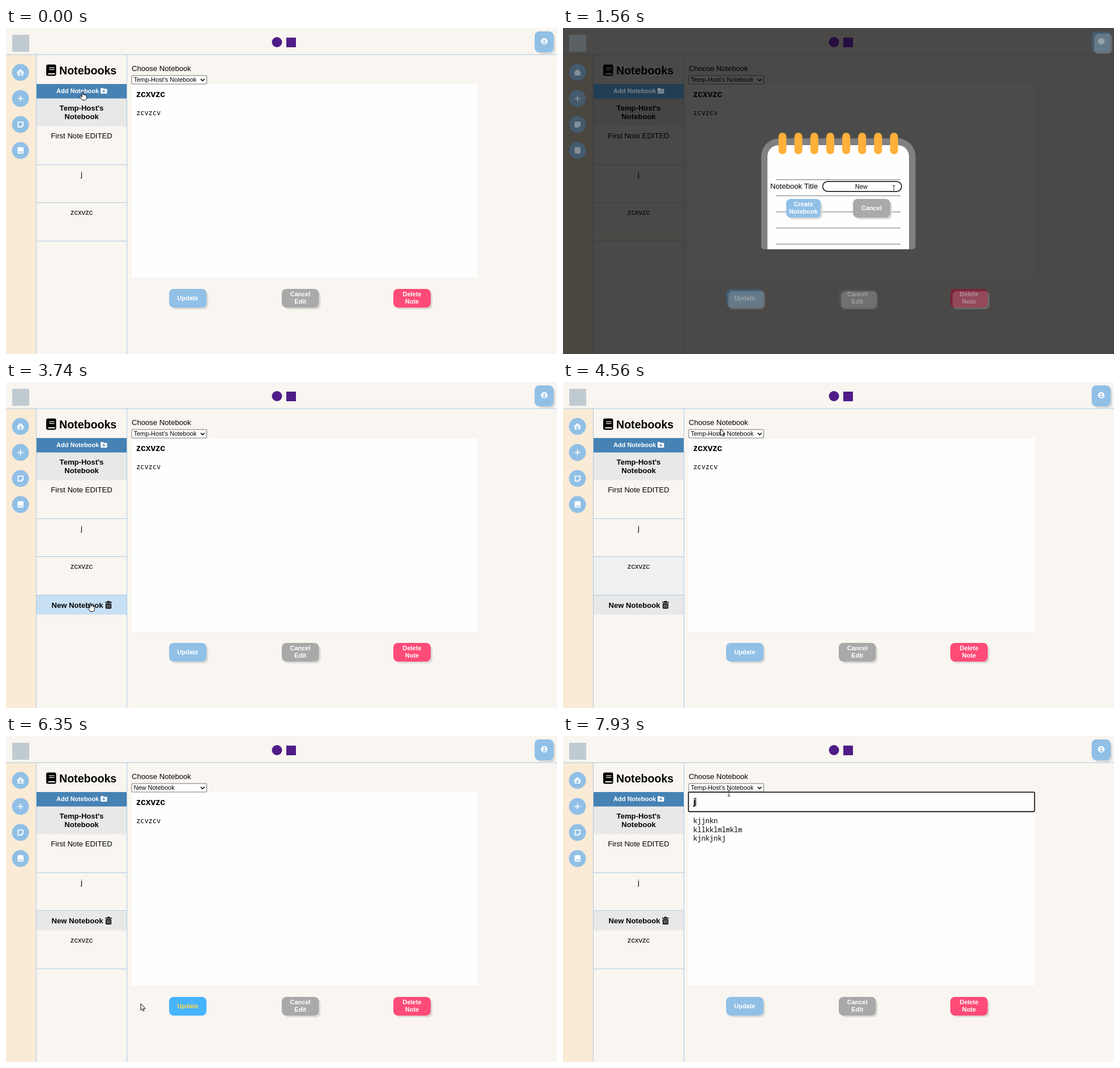
These frames come from a looping animation (973x576 px, 8 s). An HTML page with a canvas:

```html
<!DOCTYPE html>
<html lang="en">
<head>
<meta charset="utf-8">
<title>Notebooks</title>
<style>
html, body { margin: 0; width: 100%; height: 100%; overflow: hidden; background: #f9f5f0; }
canvas { display: block; }
</style>
</head>
<body>
<canvas id="stage" width="973" height="576"></canvas>
<script>
const ctx = document.getElementById('stage').getContext('2d');
const LOOP = 8000;
const SANS = '"Liberation Sans", Arial, sans-serif';
const MONO = '"Noto Sans Mono", "DejaVu Sans Mono", monospace';
const PAGE = [249, 245, 240], BLUE = [145, 192, 230], GREY = [169, 169, 169], PINK = [255, 75, 120];
const HOVER = [70, 180, 255], ROW = [232, 232, 232], ROW_HOVER = [200, 224, 244];
const SHADE = [220, 218, 215], WHITE = [255, 255, 255], YELLOW = [255, 216, 74];
const RULE = '#a9cae4';
const OWNER = "Temp-Host's";

// moments of the hard changes
const OPEN = 140, CLOSE = 2800, LIST_OPEN = 4880, PICK = 5250, SAVED = 6150, NOTE = 7220, FOCUS = 7700;

// time, x, y, pointer shape
const path = [
  [0, 135, 112, 'hand'], [70, 135, 112, 'hand'], [200, 138, 113, 'arrow'],
  [330, 153, 114, 'arrow'], [820, 405, 300, 'arrow'], [950, 440, 312, 'hand'],
  [1200, 530, 281, 'beam'], [1600, 590, 284, 'beam'], [2050, 596, 285, 'beam'],
  [2320, 431, 302, 'beam'], [2460, 432, 303, 'beam'], [2860, 432, 303, 'arrow'],
  [3260, 425, 304, 'arrow'], [3450, 300, 355, 'arrow'], [3640, 155, 388, 'hand'],
  [3740, 149, 390, 'hand'], [4010, 152, 392, 'hand'], [4250, 160, 368, 'hand'],
  [4400, 192, 318, 'arrow'], [4560, 278, 83, 'arrow'], [4750, 300, 88, 'arrow'],
  [4900, 300, 89, 'arrow'], [5120, 285, 121, 'arrow'], [5280, 285, 121, 'arrow'],
  [5680, 305, 450, 'arrow'], [5800, 315, 477, 'hand'], [6150, 315, 477, 'hand'],
  [6350, 238, 473, 'arrow'], [6600, 215, 450, 'arrow'], [6800, 150, 372, 'hand'],
  [7080, 133, 268, 'hand'], [7320, 133, 264, 'hand'], [7480, 190, 190, 'hand'],
  [7660, 288, 112, 'beam'], [7930, 293, 101, 'beam'], [8000, 293, 101, 'beam']
];

const createHover = [[820, 0], [900, 1], [1080, 1], [1250, 0], [2240, 0], [2320, 1]];
const updateHover = [[5720, 0], [5800, 1], [6360, 1], [6600, 0]];
const bookHover = [[3540, 0], [3680, 1], [4150, 1], [4450, 0], [6740, 0], [6900, 1], [6960, 1], [7160, 0]];
const lastHover = [[4200, 0], [4320, .6], [4400, .6], [4600, .1], [4700, 0], [6600, 0], [6740, .8], [6800, .8], [7000, 0]];
const jHover = [[6980, 0], [7100, 1], [7420, 1], [7700, 0]];

const mix = (a, b, k) => a + (b - a) * k;
const rgb = c => `rgb(${c.map(Math.round).join()})`;
const blend = (a, b, k) => rgb(a.map((v, i) => mix(v, b[i], k)));

function ramp(keys, t) {
  if (t <= keys[0][0]) return keys[0][1];
  for (let i = 1; i < keys.length; i++) {
    const [a, v] = keys[i - 1], [b, w] = keys[i];
    if (t < b) return mix(v, w, (t - a) / (b - a));
  }
  return keys[keys.length - 1][1];
}

function fill(color, x, y, w, h, r = 0) {
  ctx.fillStyle = color;
  ctx.beginPath();
  ctx.roundRect(x, y, w, h, r);
  ctx.fill();
}

function disc(color, x, y, r) {
  ctx.fillStyle = color;
  ctx.beginPath();
  ctx.arc(x, y, r, 0, Math.PI * 2);
  ctx.fill();
}

function shape(color, points) {
  ctx.fillStyle = color;
  ctx.beginPath();
  points.forEach(([x, y]) => ctx.lineTo(x, y));
  ctx.closePath();
  ctx.fill();
}

// y is the middle of the capitals
function text(str, x, y, size, { bold, align = 'left', color = '#000', font = SANS } = {}) {
  ctx.font = `${bold ? 'bold ' : ''}${size}px ${font}`;
  ctx.textAlign = align;
  ctx.fillStyle = color;
  ctx.fillText(str, x, y + size * .36);
}

const centred = (str, y, bold) => text(str, 133.5, y, 13.1, { bold, align: 'center' });

function button(label, x, y, w, base, hover = 0) {
  if (hover < 1) fill(blend(SHADE, base, hover), x + 4, y + 4, w - 1, 32, 8);
  fill(blend(base, HOVER, hover), x, y, w, 33, 8);
  const color = blend(WHITE, YELLOW, hover);
  const lines = label.split('\n');
  lines.forEach((line, i) => text(line, x + w / 2, y + 16 + (i - (lines.length - 1) / 2) * 13, 11,
    { bold: true, align: 'center', color }));
}

function sideIcons() {
  const blue = rgb(BLUE);
  for (let i = 0; i < 4; i++) disc(blue, 25.5, 78.5 + i * 46, 15);
  shape('#fff', [[25.5, 72.5], [32, 78.5], [30.5, 79.5], [30.5, 84], [20.5, 84], [20.5, 79.5], [19, 78.5]]);
  disc(blue, 25.5, 78.3, 1.5);
  fill(blue, 23, 80.5, 5, 2.5, 1);
  fill('#fff', 20.5, 123.8, 10, 1.6);
  fill('#fff', 24.7, 119.5, 1.6, 10);
  shape('#fff', [[20.5, 165.5], [31, 165.5], [31, 172.5], [27.5, 176], [20.5, 176]]);
  fill(blue, 22.2, 167.2, 7, 5);
  fill(blue, 22.2, 171, 4.2, 3.2);
  fill('#fff', 20.5, 210.5, 10.5, 11.5, 2);
  fill(blue, 22.5, 218.5, 7, 1.4);
}

function accents(t) {
  fill('#c0cbd1', 11, 12, 30, 30);
  disc('#4e1d87', 478.5, 25, 9);
  fill('#4e1d87', 495, 17, 17, 17);

  fill(rgb(SHADE), 938, 10, 32, 36, 8);
  fill(rgb(BLUE), 933.5, 6, 33.5, 37, 8);
  disc('#fff', 950.5, 23.5, 5.8);
  disc(rgb(BLUE), 950.5, 22, 1.8);
  fill(rgb(BLUE), 947.3, 25, 6.4, 2.3, 1.1);

  sideIcons();
  fill('#4682b4', 54, 99, 159, 25.5);
  text('Add Notebook', 89, 111.5, 11, { bold: true, color: '#fff' });
  fill('#fff', 167, 106, 5, 4, 1);
  fill('#fff', 167, 107.5, 11.5, 8.5, 1);
  fill('#4682b4', 170.2, 111.2, 5, 1.2);
  fill('#4682b4', 172.1, 109.3, 1.2, 5);

  button('Update', 288, 461, 66, BLUE, ramp(updateHover, t));
  button('Cancel\nEdit', 487, 461, 65.5, GREY);
  button('Delete\nNote', 684, 461, 66, PINK);
}

function bookRow(y, t) {
  const color = blend(ROW, ROW_HOVER, ramp(bookHover, t));
  fill(color, 54, y, 159, 34);
  text('New Notebook', 80.5, y + 17, 13.1, { bold: true });
  fill('#000', 175, y + 11.5, 12, 1.6, .5);
  fill('#000', 178.7, y + 10, 4.6, 2, .5);
  fill('#000', 176, y + 14, 10, 9.6, 1.4);
  for (let i = 0; i < 3; i++) fill(color, 178 + i * 2.6, y + 15.5, 1, 6.5);
}

function sidebar(t) {
  fill('#faebd7', 0, 47, 53, 529);
  fill(RULE, 0, 46.5, 973, 1);
  fill(RULE, 53, 47, 1, 529);
  fill(RULE, 213, 47, 1, 529);

  fill('#000', 71, 64.5, 17.5, 20, 3);
  fill('#f9f5f0', 74.5, 80, 12, 2);
  fill('#f9f5f0', 76, 69.5, 9.5, 1.3);
  fill('#f9f5f0', 76, 72.8, 9.5, 1.3);
  text('Notebooks', 94, 74.5, 19.6, { bold: true });

  fill(rgb(ROW), 54, 124, 159, 49.5);
  centred(OWNER, 141.5, true);
  centred('Notebook', 156.5, true);

  const moved = t >= SAVED;
  const lastY = moved ? 344 : 309;
  fill(blend(PAGE, ROW_HOVER, ramp(jHover, t)), 54, 242, 159, 66);
  fill(blend(PAGE, ROW_HOVER, ramp(lastHover, t)), 54, lastY, 159, 67);
  centred('First Note EDITED', 190);
  centred('j', 258.5);
  centred('zcxvzc', lastY + 16);
  [241, 308, moved ? 411 : 376].forEach(y => fill(RULE, 54, y, 159, 1));
  if (moved) bookRow(309.5, t);
  else if (t >= CLOSE) bookRow(377, t);
}

function select(t) {
  fill('#767676', 221.5, 83.5, 133.5, 16, 2);
  fill('#fff', 222.5, 84.5, 131.5, 14, 1);
  const own = t < PICK || t >= NOTE;
  text(own ? OWNER + ' Notebook' : 'New Notebook', 225.5, 91.5, 11);
  ctx.strokeStyle = '#000';
  ctx.lineWidth = 1.6;
  ctx.beginPath();
  ctx.moveTo(343.8, 90);
  ctx.lineTo(347.2, 93.4);
  ctx.lineTo(350.6, 90);
  ctx.stroke();
}

function options(y) {
  fill('#767676', 221.5, 99.5, 133.5, 30);
  fill('#fff', 222.5, 100.5, 131.5, 28);
  const on = y > 114 ? 1 : 0;
  fill('#1e90ff', 222.5, 100.5 + on * 14, 131.5, 14);
  [OWNER + ' Notebook', 'New Notebook'].forEach((name, i) =>
    text(name, 225.5, 107.5 + i * 14, 11, { color: i === on ? '#fff' : '#000' }));
}

function editor(t) {
  text('Choose Notebook', 222, 71, 13.1);
  fill('#fefefe', 221.5, 99, 611.5, 342);
  select(t);
  const swapped = t >= NOTE;
  text(swapped ? 'j' : 'zcxvzc', 230, 116.5, 15.8, { bold: true });
  const body = swapped ? ['kjjnkn', 'kllkklmlmklm', 'kjnkjnkj'] : ['zcvzcv'];
  body.forEach((line, i) => text(line, 230, 150 + i * 15.3, 12, { font: MONO }));
  if (t >= FOCUS) {
    ctx.strokeStyle = '#000';
    ctx.lineWidth = 1.6;
    ctx.beginPath();
    ctx.roundRect(221.5, 99.2, 611.2, 34.4, 1.5);
    ctx.stroke();
    fill('#000', 234, 109, 1, 15);
  }
}

function dialog(t) {
  fill('#808080', 350, 195, 272.5, 196, [32, 32, 6, 6]);
  fill('#fefefe', 361, 207, 250, 184, [20, 20, 0, 0]);
  for (let i = 0; i < 5; i++) fill('#a9a9a9', 376, 267 + i * 28.5, 220, 1.8, 1);
  for (let i = 0; i < 8; i++) fill('#ffb03a', 380.5 + i * 28.15, 185, 14, 38, 7);

  text('Notebook Title', 366, 279, 13.1);
  fill('#000', 458, 270.5, 140.5, 19, 9);
  fill('#fff', 459.4, 271.9, 137.7, 16.2, 8);
  const typed = 'New Notebook'.slice(0, Math.max(0, Math.floor((t - 1280) / 66)));
  text(typed || 'notebook title', 528.3, 280, 11, { align: 'center', color: typed ? '#000' : '#757575' });

  button('Create\nNotebook', 394, 302, 61, BLUE, ramp(createHover, t));
  button('Cancel', 512, 302, 66, GREY);
}

function pointerAt(t) {
  let i = 1;
  while (i < path.length - 1 && t >= path[i][0]) i++;
  const [t0, x0, y0, kind] = path[i - 1], [t1, x1, y1] = path[i];
  const k = Math.min(1, (t - t0) / (t1 - t0));
  return { x: mix(x0, x1, k), y: mix(y0, y1, k), kind };
}

function outline(d) {
  const p = new Path2D(d);
  ctx.lineJoin = 'round';
  ctx.fillStyle = '#fff';
  ctx.strokeStyle = '#000';
  ctx.lineWidth = 1;
  ctx.fill(p);
  ctx.stroke(p);
}

function pointer({ x, y, kind }) {
  ctx.save();
  ctx.translate(x, y);
  if (kind === 'arrow') {
    outline('M0 0V11.5L2.6 9.2L4.3 13L6.2 12.1L4.5 8.5H8Z');
  } else if (kind === 'hand') {
    outline('M-1 1.2Q0 -.4 1 1.2V6Q2.4 4.8 3.2 6.2Q4.8 5.4 5.4 6.8Q7.4 6.2 7.4 8.4V11Q7 14.5 5 15.5H0Q-2.4 13 -4.6 9.4Q-4.2 7.4 -2.4 8.6L-1 10Z');
  } else {
    fill('#333', -.5, -5.5, 1, 11);
    fill('#333', -2.5, -5.5, 5, 1);
    fill('#333', -2.5, 4.5, 5, 1);
  }
  ctx.restore();
}

function draw(t) {
  fill(rgb(PAGE), 0, 0, 973, 576);
  sidebar(t);
  editor(t);
  accents(t);
  const mouse = pointerAt(t);
  if (t >= OPEN && t < CLOSE) {
    fill('rgba(0,0,0,.7)', 0, 0, 973, 576);
    ctx.globalAlpha = .25;
    accents(t);
    ctx.globalAlpha = 1;
    dialog(t);
  }
  if (t >= LIST_OPEN && t < PICK) options(mouse.y);
  pointer(mouse);
}

function tick() {
  draw(performance.now() % LOOP);
  requestAnimationFrame(tick);
}
tick();
</script>
</body>
</html>
```
